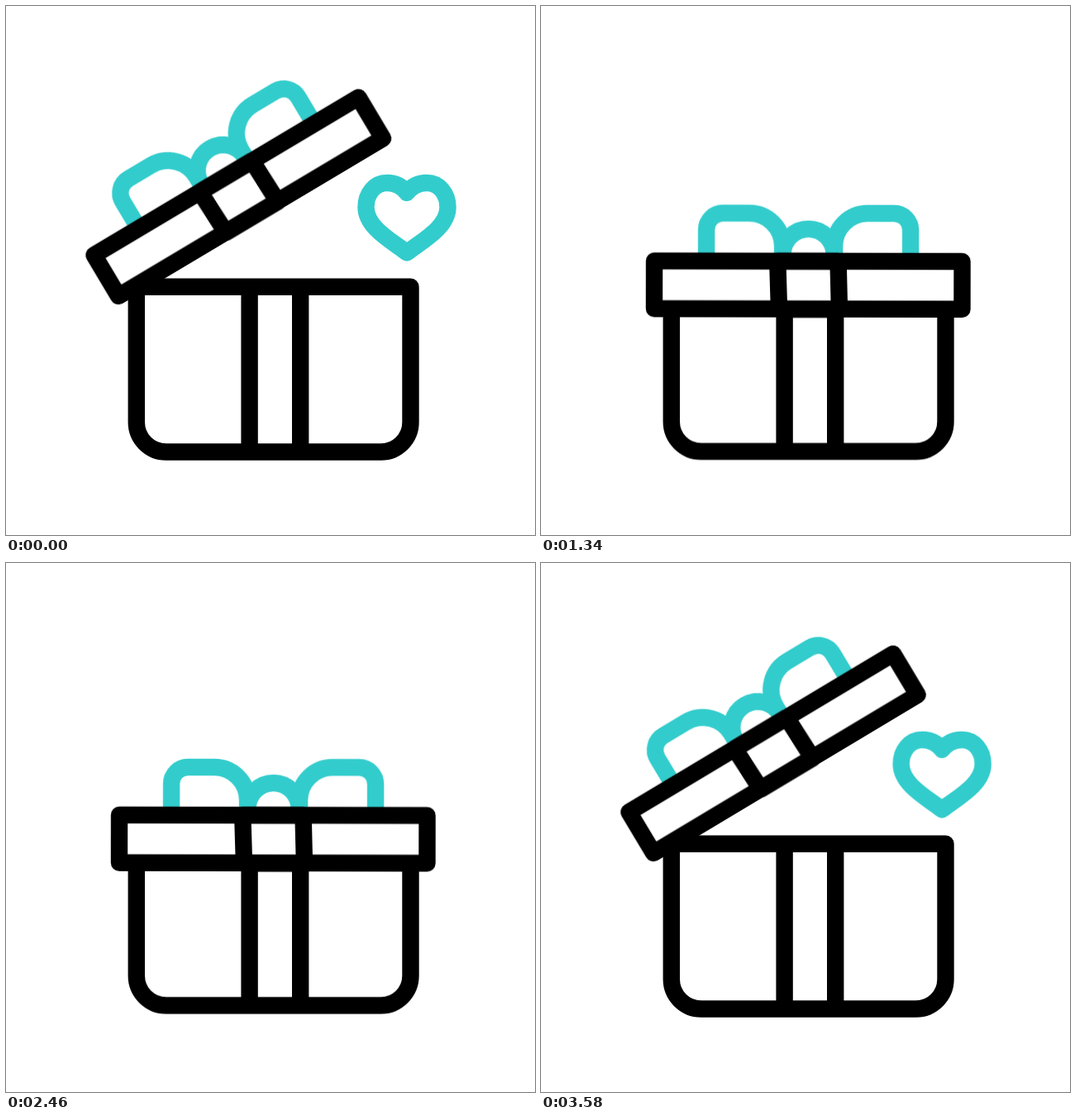
Recreate the animation shown at these times as an HTML page. Size 640 by 640 pixels, loop 3600 ms.

```html
<!DOCTYPE html>
<html lang="en">
<head>
<meta charset="utf-8">
<title>Gift box</title>
<style>
  html, body { margin: 0; width: 100%; height: 100%; overflow: hidden; background: #fff; }
  svg { display: block; width: 100vw; height: 100vh; }
  path, line { stroke-width: 20.4; stroke-linejoin: round; fill: none; }
  .ink { stroke: #000; }
  .teal { stroke: #33cccc; }
  .solid { fill: #fff; }

  .jump, .lid, .bow, .heart, .tilt, .spark {
    animation: 3600ms cubic-bezier(.33, 0, .67, 1) infinite;
  }
  .jump { animation-name: jump; }
  .lid { animation-name: lid; transform-origin: 109.4px 355.1px; }
  .bow { animation-name: bow; transform-origin: 323.5px 309px; }
  .heart { animation-name: heart; }
  .tilt { animation-name: tilt; transform-origin: 485px 256px; }
  .spark { animation-name: spark; stroke-linecap: round; }

  /* the closed box hops three times */
  @keyframes jump {
    0%, 36.667%, 70%, 100% { transform: translateY(0); }
    42.222%, 53.333%, 64.444% { transform: translateY(-20px); }
    47.778%, 58.889% { transform: translateY(28px); }
  }
  @keyframes lid {
    0%, 100% { transform: translateX(-3px) rotate(-30.8deg); }
    11.111% { transform: translateX(0) rotate(-44.9deg); }
    20% { transform: translateX(0) rotate(1.45deg); }
    25.556%, 71.111% { transform: translateX(0) rotate(.1deg); }
    88.889%, 90.556% { transform: translateX(0) rotate(-44.9deg); }
  }
  /* the bow lags behind the lid */
  @keyframes bow {
    0%, 100% { transform: rotate(0deg); }
    11.111% { transform: rotate(-12deg); }
    18.889% { transform: rotate(2.4deg); }
    27.778% { transform: rotate(3.2deg); }
    32.222%, 71.111% { transform: rotate(0deg); }
    78.333% { transform: rotate(-4deg); }
    88.889% { transform: rotate(-8deg); }
  }
  @keyframes heart {
    0%, 100% { transform: translate(0, 0); }
    18.333% { transform: translate(-162px, 98px); }
    21.111%, 74.583% { transform: translate(-162px, 116px); }
    90.556% { transform: translate(22px, -14px); }
  }
  @keyframes tilt {
    0%, 100% { transform: rotate(0deg); }
    11.111% { transform: rotate(9.5deg); }
    18.333%, 71.111% { transform: rotate(0deg); }
    78.333% { transform: rotate(-9deg); }
    90.556% { transform: rotate(5deg); }
  }
  /* each spark draws outwards, then its tail catches up */
  @keyframes spark {
    0%, 19.99% { opacity: 0; stroke-dasharray: 0 300; stroke-dashoffset: 0; }
    20% { opacity: 1; stroke-dasharray: 0 300; stroke-dashoffset: 0; }
    25.556%, 26.667% { opacity: 1; stroke-dasharray: 100 300; stroke-dashoffset: 0; }
    32.2% { opacity: 1; stroke-dasharray: 0 300; stroke-dashoffset: -100; }
    32.21%, 100% { opacity: 0; stroke-dasharray: 0 300; stroke-dashoffset: -100; }
  }
</style>
</head>
<body>
<svg viewBox="0 0 640 640">
  <g class="jump">
    <g class="heart">
      <path class="tilt teal" d="M485 226 C479 218 471 214 461 214 C446 214 435.5 227 435.5 243.5
        C435.5 269 470 286 485 298.5 C500 286 534.5 269 534.5 243.5
        C534.5 227 524 214 509 214 C499 214 491 218 485 226 Z"/>
    </g>
    <g class="ink">
      <path class="solid" d="M157.8 339.8 H489.5 V503.5 A36 36 0 0 1 453.5 539.5 H193.8 A36 36 0 0 1 157.8 503.5 Z"/>
      <path d="M294.6 339.8 V539.5 M356.2 339.8 V539.5"/>
    </g>
    <g class="lid">
      <g class="bow teal">
        <path d="M200 334 V271 A20 20 0 0 1 220 251 H252 A40 40 0 0 1 292 291 V334"/>
        <path d="M447 334 V271 A20 20 0 0 0 427 251 H395 A40 40 0 0 0 355 291 V334"/>
        <path d="M292.5 301 A31 31 0 0 1 354.5 301"/>
      </g>
      <g class="ink">
        <path class="solid" d="M137 309 H509.5 V366.7 H137 Z"/>
        <path d="M286.2 309 H359.5 L361 367.4 H288 Z"/>
      </g>
    </g>
  </g>
  <line class="spark teal" pathLength="100" x1="543" y1="327.5" x2="561" y2="314"/>
  <line class="spark teal" pathLength="100" x1="543" y1="352.5" x2="561" y2="366"/>
</svg>
</body>
</html>
```
